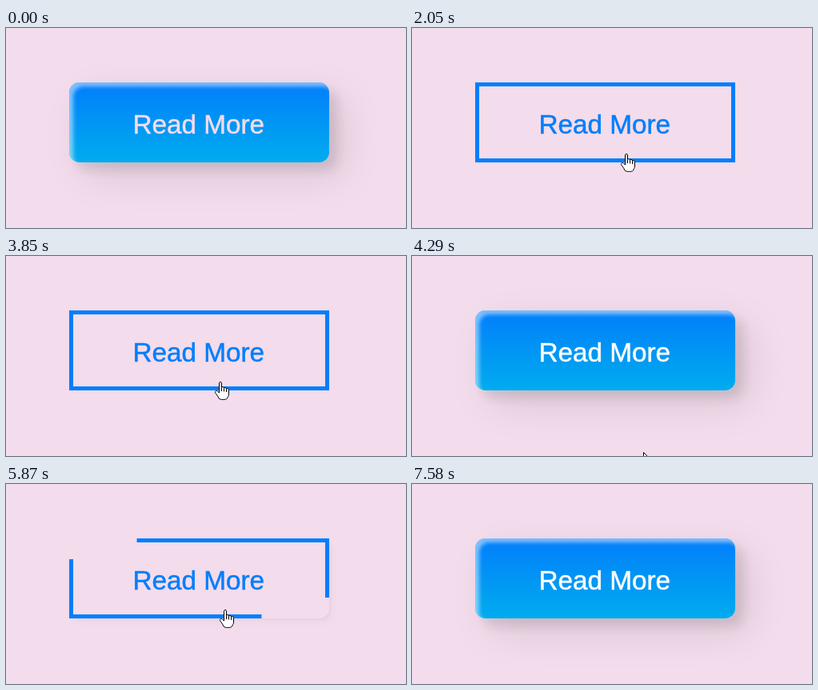
An HTML page for the animation above (8 s loop, 500x250 px).

```html
<!DOCTYPE html>
<html lang="en">
<head>
<meta charset="utf-8">
<title>Button hover</title>
<style>
  html, body { margin: 0; width: 100%; height: 100%; overflow: hidden; background: #f3dcec; }
  #stage { position: relative; width: 500px; height: 250px; overflow: hidden; }
  #btn { position: absolute; left: 79px; top: 68px; width: 325px; height: 100px; border-radius: 12.5px; }
  svg { position: absolute; left: 0; top: 0; }
  text { font: 33.3px "Liberation Sans", Arial, sans-serif; stroke-width: .5; }
  #bars { fill: #027efb; }
  #arrow, #hand { fill: #fff; stroke: #000; stroke-width: 1; stroke-linejoin: round; }
</style>
</head>
<body>
<div id="stage">
  <div id="btn"></div>
  <svg width="500" height="250" viewBox="0 0 500 250">
    <g id="bars">
      <rect id="top" y="68" height="5"/>
      <rect id="right" x="399" y="68" width="5"/>
      <rect id="bottom" x="79" y="163" height="5"/>
      <rect id="left" x="79" width="5"/>
    </g>
    <text id="label" x="158.4" y="132">Read More</text>
    <path id="arrow" d="M.5 .5V16.5L4.2 13 6.7 18.6 9.2 17.5 6.8 12H11.8Z"/>
    <g id="hand">
      <path d="M-1.5 14V1.8C-1.5 0 1.5 0 1.5 1.8V7.5C2 6 4.5 6.3 4.5 8C5.2 7 7.5 7.3 7.5 9C8.2 8 10.5 8.6 10.5 10.5V16C10.5 18 8.7 19.5 8.5 21C7.5 23 -.5 23 -2 21C-3 18 -5 16 -6.3 14C-7.3 12 -5.2 10.6 -3.8 12Z"/>
      <path fill="none" d="M1.5 7.5V12M4.5 8V12.5M7.5 9V13"/>
    </g>
  </svg>
</div>
<script>
  const LOOP = 8000, FADE = 300;
  const W = 325, H = 100, BLUE = '#027efb', PINK = '#f3dcec';
  const hovers = [[1720, 3985], [5738, 7275]];

  const easeIn = n => u => u ** n;
  const easeOut = n => u => 1 - (1 - u) ** n;

  // Each visit: when the cursor shows, where it starts, and its moves
  const visits = [
    { from: 900, to: 4800, start: [443, 240], moves: [
      { at: 900, end: 1720, pos: [266, 168], ease: easeOut(1.3) },
      { at: 1720, end: 1950, pos: [268, 157], ease: easeOut(1) },
      { at: 3840, end: 4240, pos: [289, 245], ease: easeIn(2) }
    ] },
    { from: 5450, to: 7500, start: [288, 221], moves: [
      { at: 5450, end: 6130, pos: [273, 153], ease: easeOut(3) },
      { at: 7000, end: 7500, pos: [285, 252], ease: easeIn(3) }
    ] }
  ];
  const $ = id => document.getElementById(id);
  const set = (id, attrs) => {
    for (const k in attrs) $(id).setAttribute(k, attrs[k]);
  };

  // CSS "ease": cubic-bezier(.25, .1, .25, 1)
  function cssEase(x) {
    if (x <= 0) return 0;
    if (x >= 1) return 1;
    const curve = (a, b, s) => 3 * a * s * (1 - s) ** 2 + 3 * b * s * s * (1 - s) + s ** 3;
    let lo = 0, hi = 1;
    for (let i = 0; i < 24; i++) {
      const mid = (lo + hi) / 2;
      if (curve(.25, .25, mid) < x) lo = mid; else hi = mid;
    }
    return curve(.1, 1, lo);
  }

  function cursorAt(t) {
    const visit = visits.find(v => t >= v.from && t < v.to);
    if (!visit) return null;
    let pos = visit.start;
    for (const m of visit.moves) {
      if (t < m.at) break;
      const k = m.ease(Math.min(1, (t - m.at) / (m.end - m.at)));
      pos = pos.map((p, i) => p + (m.pos[i] - p) * k);
    }
    return pos.map(Math.round);
  }

  function shadow(k) {
    const layer = (inset, d, blur, rgb, a) =>
      `${inset} ${d * k}px ${d * k}px ${blur * k}px rgba(${rgb},${a * k})`;
    return [
      layer('inset', 5, 5, '255,255,255', .5),
      layer('', 17.5, 50, '0,0,0', .1),
      layer('', 10, 12.5, '0,0,0', .1)
    ].join(',');
  }

  function draw(t) {
    const over = hovers.some(([a, b]) => t >= a && t < b);
    let p = 0;
    for (const [a, b] of hovers) {
      if (t >= a) p = t < b ? cssEase((t - a) / FADE) : 1 - cssEase((t - b) / FADE);
    }

    $('btn').style.background = over ? 'none' : `linear-gradient(0deg, #00acee, ${BLUE})`;
    $('btn').style.boxShadow = p < 1 ? shadow(1 - p) : 'none';
    const ink = over ? BLUE : t < hovers[0][0] ? PINK : '#fff';
    set('label', { fill: ink, stroke: ink });

    const w = W * p, h = H * p;
    set('top', { x: 404 - w, width: w });
    set('right', { height: h });
    set('bottom', { width: w });
    set('left', { y: 168 - h, height: h });

    const pos = cursorAt(t);
    for (const id of ['arrow', 'hand']) {
      const shown = pos && (id === 'hand') === over;
      set(id, {
        visibility: shown ? 'visible' : 'hidden',
        transform: `translate(${pos || [0, 0]})`
      });
    }
  }

  const start = performance.now();
  function tick() {
    draw((performance.now() - start) % LOOP);
    requestAnimationFrame(tick);
  }
  tick();
</script>
</body>
</html>
```
